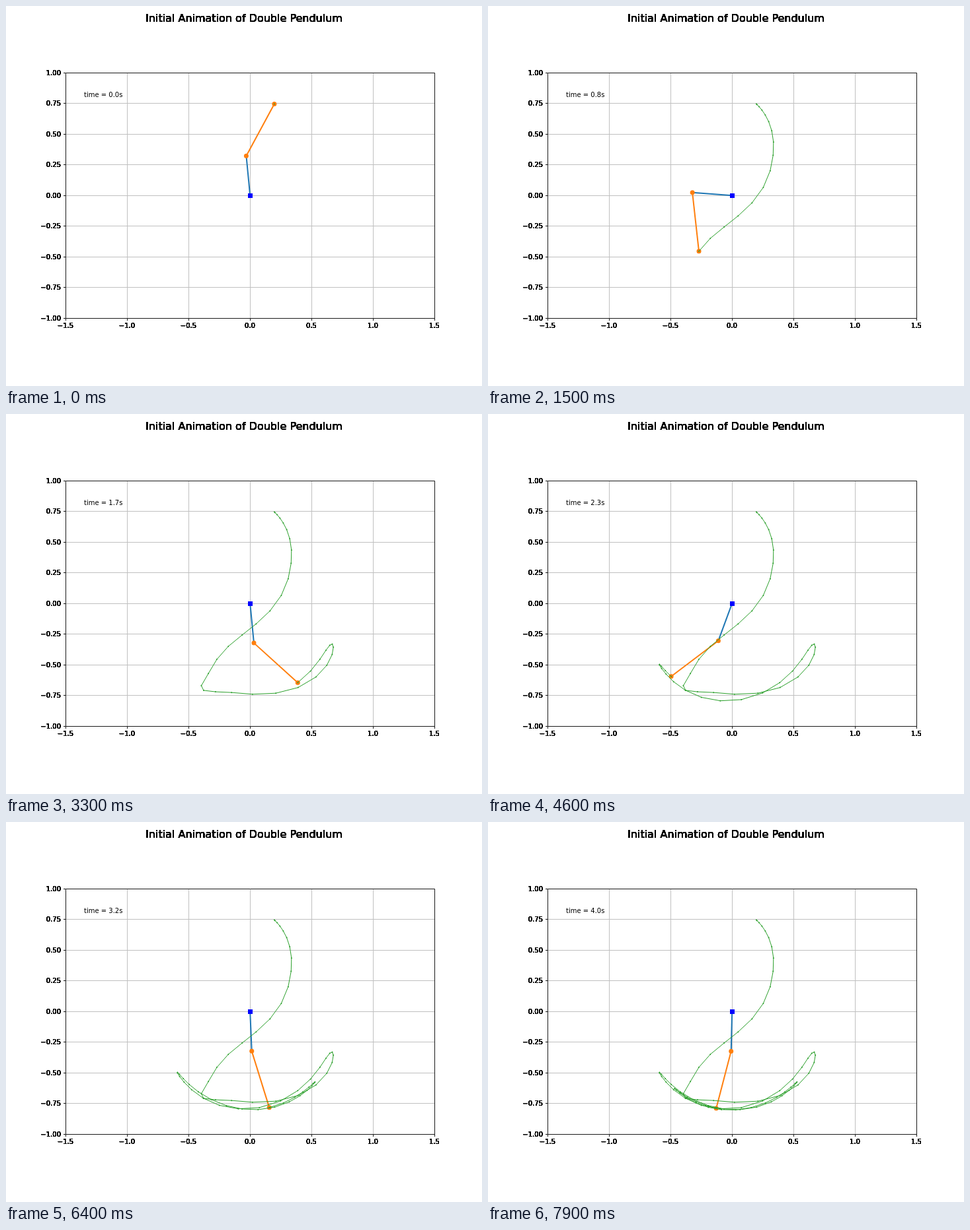
These frames come from a looping animation (720x576 px, 8 s). An HTML page with a canvas:

```html
<!DOCTYPE html>
<html lang="en">
<head>
<meta charset="utf-8">
<title>Double Pendulum</title>
<style>
html, body { margin: 0; width: 100%; height: 100%; overflow: hidden; background: #fff; }
canvas { display: block; }
</style>
</head>
<body>
<canvas id="stage" width="720" height="576"></canvas>
<script>
const ctx = document.getElementById('stage').getContext('2d');
const FRAMES = 80, STEP = 100;
const PIVOT = [369.2, 287.2], ARM1 = 60.2, ARM2 = 89.5;
const LEFT = 90, TOP = 101, WIDTH = 558, HEIGHT = 372;
const GRID = '#c0c0c0', INK = '#1a1a1a';
const BLUE = '#1f77b4', ORANGE = '#ff7f0e', GREEN = '#2ca02c';

// Key poses: step, then upper and lower arm angle in degrees from straight down
const POSES = [
  [0, -174.5, 151.7], [4, -167.4, 135], [8, -153.2, 94.6], [12, -133, 36.4],
  [14, -110.8, 15.1], [16, -73.9, -3.3], [18, -23, -31.5], [20, 16.6, -30.3],
  [22, 39.4, 0.5], [24, 45.3, 39.5], [27, 40.1, 77], [30, 26.5, 79],
  [33, 5.5, 47.8], [36, -15.4, -1.2], [39, -26, -44], [42, -30.4, -62.5],
  [46, -20.2, -52.8], [50, 5, -11.2], [54, 21.5, 36.6], [58, 25, 54.3],
  [62, 13, 37], [66, -8, -5], [70, -18.5, -42], [74, -19, -45.8],
  [78, -5, -23], [82, 9.5, 15]];

// Slope of the parabola through a pose and its neighbours; the motion starts at rest
function slope(i, arm) {
  if (i === 0) return 0;
  const [p, q, r] = [POSES[i - 1], POSES[i], POSES[i + 1] || POSES[i]];
  const h0 = q[0] - p[0], h1 = r[0] - q[0];
  const d0 = (q[arm] - p[arm]) / h0;
  return h1 ? (d0 * h1 + (r[arm] - q[arm]) / h1 * h0) / (h0 + h1) : d0;
}

// Cubic Hermite curve between the poses, in radians
function angle(arm, n) {
  const i = POSES.findIndex(p => p[0] > n) - 1;
  const p = POSES[i], q = POSES[i + 1], h = q[0] - p[0], u = (n - p[0]) / h, v = 1 - u;
  const deg = v * v * ((1 + 2 * u) * p[arm] + u * h * slope(i, arm))
            + u * u * ((1 + 2 * v) * q[arm] - v * h * slope(i + 1, arm));
  return deg * Math.PI / 180;
}

const range = n => [...Array(n).keys()];
const swing = ([x, y], length, a) => [x + length * Math.sin(a), y + length * Math.cos(a)];
const elbows = range(FRAMES).map(n => swing(PIVOT, ARM1, angle(1, n)));
const tips = elbows.map((elbow, n) => swing(elbow, ARM2, angle(2, n)));

function line(points, color, width) {
  ctx.beginPath();
  points.forEach(p => ctx.lineTo(...p));
  ctx.strokeStyle = color;
  ctx.lineWidth = width;
  ctx.stroke();
}

function dot([x, y], radius, color) {
  ctx.beginPath();
  ctx.arc(x, y, radius, 0, 2 * Math.PI);
  ctx.fillStyle = color;
  ctx.fill();
}

function text(str, x, y, size, align, passes = 1) {
  ctx.font = `${size}px "DejaVu Sans", sans-serif`;
  ctx.textAlign = align;
  ctx.fillStyle = '#000';
  // repeated passes darken the glyph edges
  while (passes--) ctx.fillText(str, x, y);
}

const label = (v, digits) => (v < 0 ? '\u2212' : '') + Math.abs(v).toFixed(digits);

function drawAxes() {
  const right = LEFT + WIDTH, bottom = TOP + HEIGHT;
  const xs = range(7).map(i => LEFT + 93 * i + 0.5);
  const ys = range(9).map(i => Math.round(100.56 + 46.5 * i) + 0.5);
  xs.forEach(x => line([[x, TOP], [x, bottom]], GRID, 1));
  ys.forEach(y => line([[LEFT, y], [right, y]], GRID, 1));
  xs.forEach((x, i) => {
    line([[x, bottom], [x, bottom + 4]], INK, 1);
    text(label(i / 2 - 1.5, 1), x - 0.5, 488, 10, 'center', 12);
  });
  ys.forEach((y, i) => {
    line([[LEFT - 3, y], [LEFT, y]], INK, 1);
    text(label(1 - i / 4, 2), 83, y + 3.5, 10, 'right', 12);
  });
  ctx.strokeRect(LEFT + 0.5, TOP + 0.5, WIDTH, HEIGHT);
  text('Initial Animation of Double Pendulum', 360, 24, 16, 'center', 12);
}

// One decimal, exact ties going to the even digit
const clock = n => (n * 0.05 - (n % 20 === 5 ? 1e-6 : 0)).toFixed(1);

function draw(n) {
  ctx.fillStyle = '#fff';
  ctx.fillRect(0, 0, 720, 576);
  drawAxes();
  const elbow = elbows[n], tip = tips[n], trail = tips.slice(0, n + 1);
  line([PIVOT, elbow], BLUE, 2);
  line([elbow, tip], ORANGE, 2);
  dot(elbow, 3.5, ORANGE);
  dot(tip, 3.5, ORANGE);
  line(trail, GREEN, 1);
  trail.forEach(p => dot(p, 1, GREEN));
  ctx.fillStyle = '#00f';
  ctx.fillRect(366, 284, 7, 7);
  text(`time = ${clock(n)}s`, 118, 138, 10, 'left');
}

function tick() {
  draw(Math.floor(performance.now() / STEP) % FRAMES);
  requestAnimationFrame(tick);
}
ctx.lineJoin = 'round';
tick();
</script>
</body>
</html>
```
